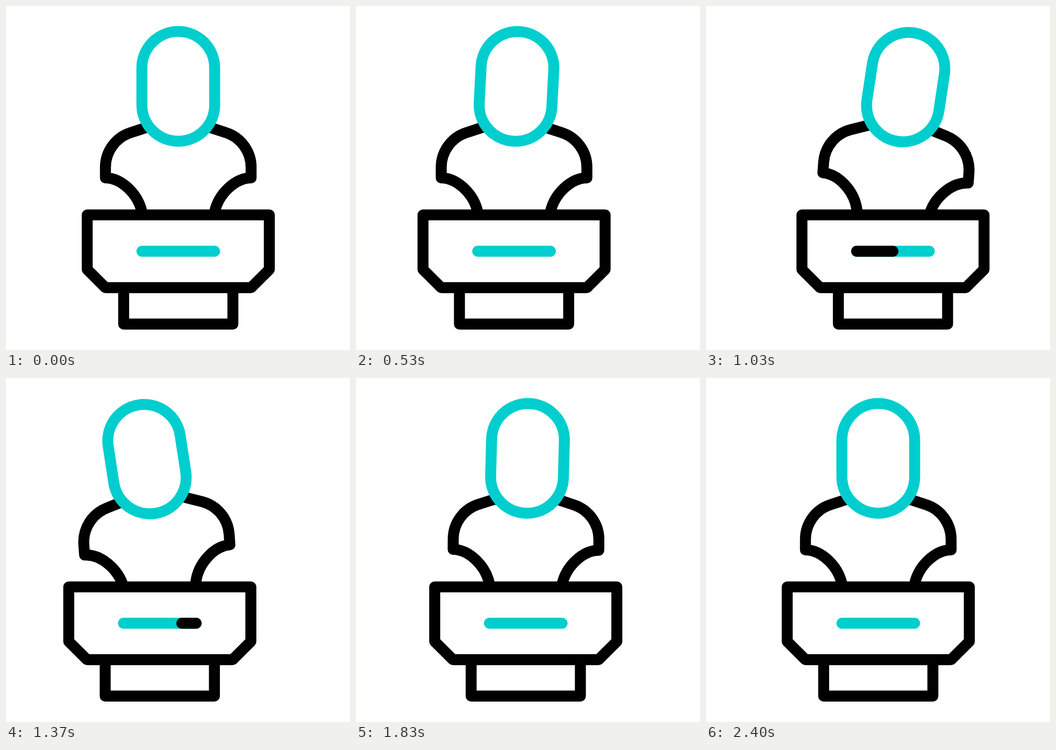
These frames come from a looping animation (640 by 640 pixels, 2.67 s). An HTML page:

```html
<!DOCTYPE html>
<html lang="en">
<head>
<meta charset="utf-8">
<title>Swaying bust</title>
<style>
  html, body { margin: 0; width: 100%; height: 100%; overflow: hidden; background: #fff; }
  svg { display: block; width: 100vw; height: 100vh; }
  .ink { fill: none; stroke: #000; stroke-width: 20.4; stroke-linecap: round; stroke-linejoin: round; }
  .solid { fill: #fff; }
  .teal { stroke: #00cece; }
</style>
</head>
<body>
<svg viewBox="0 0 640 640">
  <g id="all" class="ink">
    <g id="body">
      <path id="side" d="M272 222.5 L231.8 235.6 A67.7 67.7 0 0 0 185 300 V319.7 C215 320 246 350 253 384 L255 403"/>
      <use href="#side" transform="matrix(-1 0 0 1 641 0)"/>
      <rect id="head" class="solid teal" x="252.8" y="47.4" width="135.4" height="204.2" rx="67.7"/>
    </g>
    <path class="solid" d="M218.9 524 V591.7 H422.1 V524"/>
    <path class="solid" d="M151.1 388.6 H489.9 V490.2 L456 524 H185 L151.1 490.2 Z"/>
    <path class="teal" d="M252.8 456.3 H388.2"/>
    <line id="sweep" y1="456.3" y2="456.3"/>
  </g>
</svg>
<script>
const LOOP = 2670;
const [all, body, head, sweep] = ['all', 'body', 'head', 'sweep'].map(id => document.getElementById(id));

// Shared swing keys, in ticks of 1/30 s; body and head trail behind the base.
const KEYS = [0, 10, 20, 30, 40, 50, 59, 70];
const SHIFT = [0, 56.5, -71.5, 29.2, -35.8, 15.4, -19, 0];
const LEAN = [0, 8, -8, 4, -4, 2, -2, 0];
const NOD = LEAN.map(a => a * 1.25);

function ease(from, to, tick) {
  const u = Math.min(1, Math.max(0, (tick - from) / (to - from)));
  return u * u * (3 - 2 * u);
}

function swing(values, tick) {
  return KEYS.slice(1).reduce((v, key, i) =>
    v + (values[i + 1] - values[i]) * ease(KEYS[i], key, tick), values[0]);
}

function draw(now) {
  // Ticks start on whole hundredths of a second.
  const time = Math.floor((now % LOOP) / 10) * 10;
  const tick = Math.floor((time + 3.4) * 0.03);

  all.setAttribute('transform', `translate(${swing(SHIFT, tick)} 0)`);
  body.setAttribute('transform', `rotate(${swing(LEAN, tick - 1)} 320.5 388)`);
  head.setAttribute('transform', `rotate(${swing(NOD, tick - 2)} 320.5 237.5)`);

  const start = ease(31, 45, tick), end = ease(24, 38, tick);
  sweep.setAttribute('x1', 252.8 + 135.4 * start);
  sweep.setAttribute('x2', 252.8 + 135.4 * end);
  sweep.style.display = end > start ? '' : 'none';
}

let origin;
function loop(now) {
  origin ??= now;
  draw(now - origin);
  requestAnimationFrame(loop);
}
draw(0);
requestAnimationFrame(loop);
</script>
</body>
</html>
```
